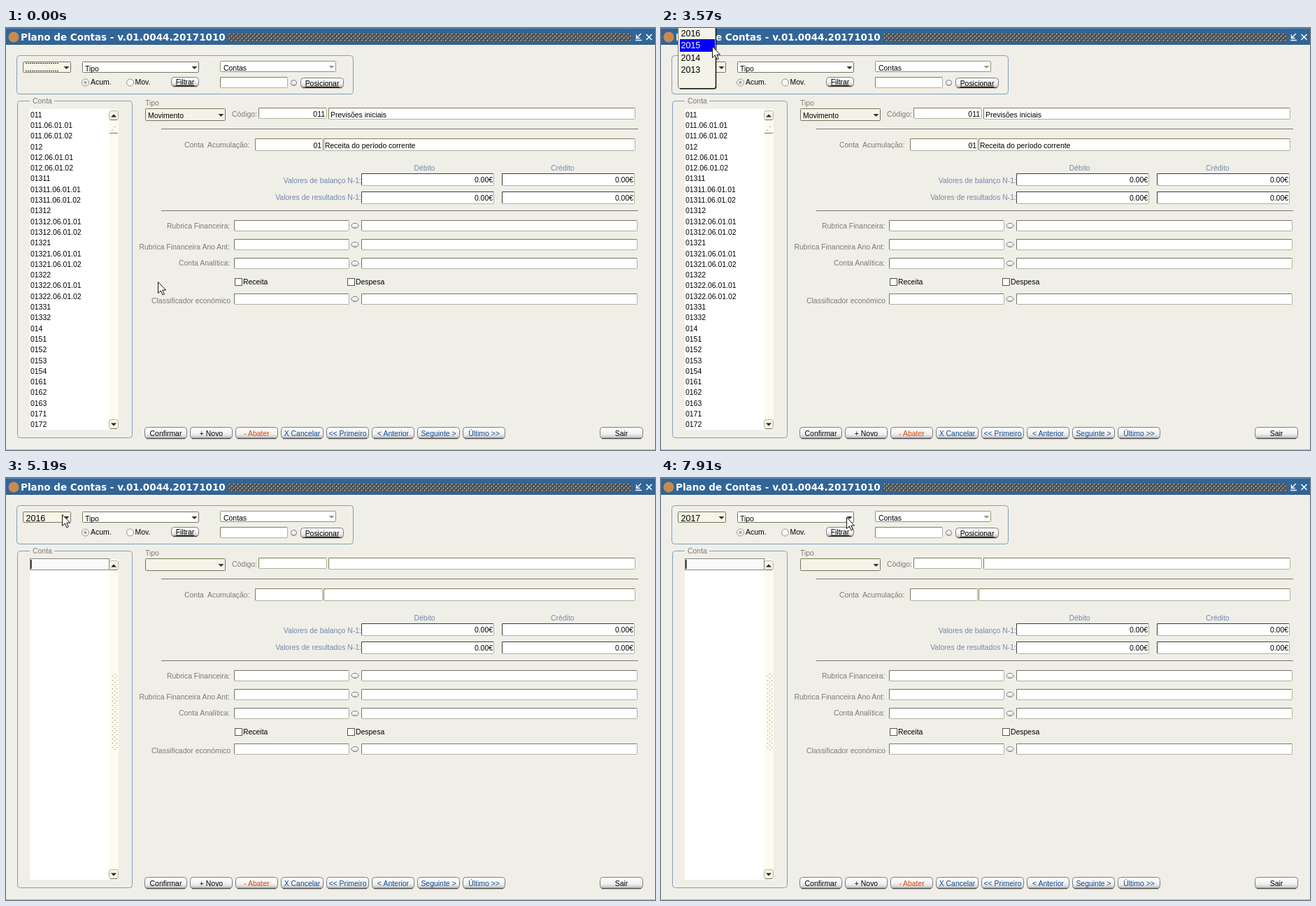
These frames come from a looping animation (928x604 px, 7990 ms). An HTML page:

```html
<!DOCTYPE html>
<html lang="pt">
<head>
<meta charset="utf-8">
<title>Plano de Contas</title>
<style>
  html, body { margin: 0; width: 100%; height: 100%; overflow: hidden; background: #f0efe7; }
  svg { display: block; }
  text { font: 10.45px "Liberation Sans", Arial, sans-serif; white-space: pre; }
  .title { font: bold 13.5px "DejaVu Sans", Verdana, sans-serif; }
  .year { font-size: 12.5px; }
</style>
</head>
<body>
<svg id="stage" width="928" height="604" viewBox="0 0 928 604">
  <defs>
    <linearGradient id="face" x1="0" y1="0" x2="0" y2="1">
      <stop offset="0" stop-color="#ffffff"/>
      <stop offset=".6" stop-color="#f0f0ee"/>
      <stop offset="1" stop-color="#bdbdbd"/>
    </linearGradient>
    <pattern id="bumps" width="6" height="6" patternUnits="userSpaceOnUse" y="1">
      <rect width="6" height="6" fill="#55595c"/>
      <path d="M1 1h1.5v1.5h-1.5zM4 4h1.5v1.5h-1.5z" fill="#d4d6d4"/>
      <path d="M2 2h1.5v1.5h-1.5zM5 5h1v1h-1z" fill="#2c2e30"/>
    </pattern>
    <pattern id="grip" width="6" height="6" x="151" y="279" patternUnits="userSpaceOnUse">
      <path d="M4 1h1.2v1.2h-1.2zM1 4h1.2v1.2h-1.2z" fill="#9a9a80"/>
    </pattern>
    <clipPath id="popClip"><rect id="popClipBox" width="100" height="140"/></clipPath>
  </defs>
</svg>
<script>
const stage = document.getElementById('stage');
const LOOP = 7990;
const GREY = '#7b7b76', BLUE = '#7189ad', LINK = '#0b4a96';
const OLIVE = '#7f7f58', DARK = '#3c3c38', STONE = '#74746a';

// ---- drawing helpers: each returns markup ----
const box = (x, y, x2, y2, fill, stroke = 'none', r = 0) =>
  `<rect x="${x}" y="${y}" width="${x2 - x}" height="${y2 - y}" rx="${r}" fill="${fill}" stroke="${stroke}"/>`;
const path = (d, stroke, fill = 'none', w = 1) =>
  `<path d="${d}" stroke="${stroke}" fill="${fill}" stroke-width="${w}"/>`;
// y is the middle of the capitals; baselines sit on whole pixels
const label = (s, x, y, fill = '#000', anchor = 'start', extra = '') =>
  `<text x="${x}" y="${Math.round(y + 3.6)}" fill="${fill}" text-anchor="${anchor}" ${extra}>${s.replace(/</g, '&lt;')}</text>`;
const arrow = (x, y, fill = '#333', dir = 1) =>
  path(`M${x - 4} ${y - 2 * dir}h8l-4 ${4 * dir}z`, 'none', fill);
const group = (id, ...parts) => `<g id="${id}">${parts.join('')}</g>`;

function field(x, y, x2, y2, edge = OLIVE) {
  return box(x + .5, y + .5, x2 - .5, y2 - .5, '#fff', '#b0b09c', 1) +
    path(`M${x + .5} ${y2 - 1}V${y + .5}H${x2 - 1}`, edge);
}
function combo(x, y, x2, y2, fill, edge = '#74745a', tip = '#333') {
  return box(x + .5, y + .5, x2 - .5, y2 - .5, fill, edge, 1) + arrow(x2 - 6.5, (y + y2) / 2 + 1, tip);
}
function button(x, y, x2, y2, s, fill = '#000', extra = '') {
  return box(x + .5, y + .5, x2 - .5, y2 - .5, 'url(#face)', '#7c7c82', 4) +
    path(`M${x + 3} ${y2 - .5}H${x2 - 3}`, '#4c4c52', 'none', 1.4) +
    label(s, (x + x2) / 2, (y + y2) / 2 + .5, fill, 'middle', extra);
}
const pill = (x, y, rx, ry) =>
  `<ellipse cx="${x}" cy="${y}" rx="${rx}" ry="${ry}" fill="url(#face)" stroke="#77777a"/>`;
const radio = x => `<circle cx="${x}" cy="78" r="5" fill="#f8f8f2" stroke="#93938f"/>`;

function titleBar() {
  return box(0, 0, 928, 24, '#326598') +
    path('M0 .5H928', '#5f87ae') + path('M0 23.5H928', '#285581') +
    '<circle cx="11" cy="13" r="7.5" fill="#c98a52"/>' +
    '<text class="title" x="21" y="18" fill="#fff">Plano de Contas - v.01.0044.20171010</text>' +
    box(317, 7, 895, 20, 'url(#bumps)') +
    path('M908 8l-6 6M901.5 9.5v5h5M900 17.5h9', '#fff', 'none', 1.4) +
    path('M915.5 9l8 8M923.5 9l-8 8', '#fff', 'none', 1.6);
}

function filters() {
  const line = 'text-decoration="underline"';
  return box(15.5, 39.5, 496.5, 94.5, 'none', '#7f9fbf', 4) +
    combo(24, 48, 93, 64, '#f5f5e8') +
    combo(109, 48, 276, 64, '#fff') + label('Tipo', 113, 58) +
    combo(306, 47, 472, 63, '#fff', '#8a9a6a', '#999') + label('Contas', 311, 57) +
    radio(113.5) + '<circle cx="113.5" cy="78" r="2.2" fill="#a8a8a2"/>' + label('Acum.', 121, 77.5) +
    radio(177.5) + label('Mov.', 184.5, 77.5) +
    button(236, 70, 276, 84, 'Filtrar', '#000', line) +
    field(306, 70, 403, 86) + pill(411.5, 78.5, 4, 4) +
    button(421, 71, 483, 86, 'Posicionar', '#000', line);
}

function listPanel() {
  const scroll = (y, dir) => box(147.5, y, 160.5, y + 13, '#f4f4e8', '#b5b5a2', 3) +
    path(`M149 ${y + 13}h10`, '#74745a') + arrow(154, y + 7, '#222', dir);
  return path('M34 104.5H20.5a4 4 0 0 0-4 4V582.5a4 4 0 0 0 4 4H176.5a4 4 0 0 0 4-4V108.5a4 4 0 0 0-4-4H69', '#7f9fbf') +
    label('Conta', 38, 104.5, GREY) +
    box(34, 116, 148, 575, '#fff') + box(148, 116, 161, 575, '#fbfbef') +
    scroll(118.5, -1) + scroll(560.5, 1);
}

function form() {
  let s = label('Tipo', 199, 107.5, GREY) + combo(199, 115, 314, 133, '#f3f3e8') +
    label('Código:', 323, 123, GREY) + field(361, 114, 459, 130) + field(461, 114, 900, 131) +
    path('M222 144.5H904M222 261.5H904', '#77776f') +
    label('Conta  Acumulação:', 255, 167, GREY) + field(356, 158, 453, 176) + field(454, 158, 900, 176) +
    label('Débito', 583.5, 200.5, BLUE) + label('Crédito', 779, 200.5, BLUE) +
    label('Valores de balanço N-1:', 508, 218, BLUE, 'end') +
    label('Valores de resultados N-1:', 508, 242.5, BLUE, 'end');
  for (const y of [208, 234])
    for (const x of [508, 709])
      s += field(x, y, x + 190, y + 18, DARK) + label('0.00€', x + 188, y + 9.2, '#000', 'end');
  const rows = [['Rubrica Financeira:', 230, 283.5, 283], ['Rubrica Financeira Ano Ant:', 190.5, 313, 310],
    ['Conta Analítica:', 247, 336, 337], ['Classificador económico', 208, 390, 388]];
  for (const [name, x, ty, y] of rows)
    s += label(name, x, ty, GREY) + field(326, y - 8, 491, y + 8, STONE) + pill(499, y, 5, 3.5) +
      field(508, y - 8, 903, y + 8, STONE);
  for (const [name, x] of [['Receita', 327], ['Despesa', 488]])
    s += box(x + .5, 358.5, x + 10.5, 368.5, '#fff', '#55554a') + label(name, x + 12, 363.5);
  const names = ['Confirmar', '+ Novo', '- Abater', 'X Cancelar', '<< Primeiro', '< Anterior', 'Seguinte >', 'Último >>'];
  names.forEach((n, i) => {
    const x = 198 + 65 * i;
    s += button(x, 571, x + 61, 588, n, i < 2 ? '#000' : i === 2 ? '#d2480f' : LINK);
  });
  return s + button(849, 571, 911, 588, 'Sair');
}

// account codes: heads that carry two sub-accounts, then plain ones
const codes = [];
for (const c of ['011', '012', '01311', '01312', '01321', '01322']) codes.push(c, c + '.06.01.01', c + '.06.01.02');
codes.push(...'01331 01332 014 0151 0152 0153 0154 0161 0162 0163 0171 0172'.split(' '));

const loaded = group('loaded',
  codes.map((c, i) => label(c, 35, 124 + 15.3 * i)).join(''),
  path('M148 150.5h12', '#74745a'), path('M151 147l2-2M155 142.5l2-2', '#a5a58c'),
  label('Movimento', 203, 125), label('011', 456, 123.5, '#000', 'end'), label('Previsões iniciais', 464, 124),
  label('01', 451, 168, '#000', 'end'), label('Receita do período corrente', 456, 168));
const emptied = group('emptied', box(151, 279, 159, 390, 'url(#grip)'));
const listCaret = group('caret', box(35, 116, 148, 131, '#f9f9f9'),
  `<rect id="rowEdge" x="34.5" y="115.5" width="113" height="16" fill="none" stroke="#85857e"/>`,
  path('M35.9 117v13', '#000', 'none', 1.4));
const dashes = group('dashes',
  '<path d="M28 50.5H76M28 61.5H76" stroke="#222" stroke-dasharray="2 1"/>');

// ---- year popup ----
const YEARS = ['2017', '2016', '2015', '2014', '2013', ''];
const PITCH = 17.25;
const popup = `<g clip-path="url(#popClip)"><g id="popup">
  <rect id="popBox" x="24.5" width="54" rx="3" fill="#f3f3e8" stroke="#77776a"/>
  <path id="popEdge" fill="none" stroke="#111" stroke-width="1.5"/>
  <rect id="mark" x="27" width="50" height="18" fill="#0000fb"/>
  ${YEARS.map(() => '<text class="year item" x="28.5"></text>').join('')}</g></g>`;

stage.insertAdjacentHTML('beforeend', box(0, 0, 928, 604, '#f0efe7') + path('M0 603.5H928', '#b9b9b0') +
  titleBar() + filters() + listPanel() + form() + loaded + emptied + listCaret + dashes +
  '<text id="year" class="year" x="28.5" y="62"></text>' + popup +
  group('pointer', path('M.5 .5V16.6L4.3 13L7 18.9L9.3 17.9L6.7 12.1H11.6Z', '#111', '#fff')));

const $ = id => document.getElementById(id);
const items = [...document.querySelectorAll('.item')];
const show = (id, on) => $(id).setAttribute('display', on ? 'inline' : 'none');

// pointer moves: first step, last step, tip positions at even steps
const moves = [
  [0, 0, [[217, 363]]],
  [1160, 1940, [[220, 360], [214, 303], [193, 218], [167, 135], [143, 78], [127, 55], [120, 48], [112, 47], [104, 49], [97, 52], [91, 55]]],
  [2010, 2010, [[81, 55]]],
  [2240, 2320, [[82, 54], [84, 54]]],
  [3420, 3950, [[80, 40], [76, 31], [73, 26], [71, 21], [68, 17], [65, 14], [62, 13], [60, 12]]],
  [4730, 5270, [[61, 14], [63, 20], [67, 28], [71, 36], [75, 43], [78, 49], [80, 52], [81, 54]]],
  [5900, 6050, [[79, 52], [75, 48], [71, 44]]],
  [7060, 7670, [[80, 43], [104, 44], [138, 46], [172, 48], [203, 50], [228, 52], [246, 53], [256, 54], [261, 54]]],
  [7840, 7910, [[263, 55], [265, 56]]],
];
function tip(t) {
  const [a, b, pts] = moves.findLast(m => t >= m[0]);
  const step = (b - a) / (pts.length - 1) || 1;
  return pts[Math.min(pts.length - 1, Math.floor((t - a) / step + .15))];
}

// each opening: shown, chosen, gone, middle of the top row, number of rows, preselected row
const openings = [
  { from: 2640, pick: 4430, to: 4500, top: -9, rows: 6, sel: 5 },
  { from: 5420, pick: 6430, to: 6520, top: 43, rows: 5, sel: 1 },
];
function drawPopup(t, [px, py]) {
  const o = openings.find(p => t >= p.from && t < p.to);
  show('popup', o);
  if (!o) return;
  const y = o.top - 12.5, end = o.top + (o.rows - 1) * PITCH + 9.5;
  const hot = px < 79 ? Math.max(0, Math.min(o.rows - 1, Math.floor((py - o.top + 9) / PITCH))) : o.sel;
  $('popClipBox').setAttribute('height', t >= o.pick ? 47 : 140);
  $('popBox').setAttribute('y', y);
  $('popBox').setAttribute('height', end - y);
  $('popEdge').setAttribute('d', `M27 ${end}H76q2.5 0 2.5 -2.5V${y + 3}`);
  $('mark').setAttribute('y', Math.round(o.top + hot * PITCH - 9.5));
  items.forEach((el, i) => {
    el.textContent = i < o.rows ? YEARS[i] : '';
    el.setAttribute('y', Math.round(o.top + i * PITCH + 3.9));
    el.setAttribute('fill', i === hot ? '#fff' : '#000');
  });
}

function draw() {
  const t = performance.now() % LOOP;
  const p = tip(t);
  const full = t < 4430;
  show('loaded', full);
  show('dashes', full);
  show('emptied', !full);
  show('caret', (t >= 4430 && t < 5420) || t >= 6430);
  show('rowEdge', (t >= 4730 && t < 5420) || t >= 7060);
  $('year').textContent = full ? '' : t < 6430 ? '2016' : '2017';
  drawPopup(t, p);
  $('pointer').setAttribute('transform', `translate(${p[0]} ${p[1]})`);
  requestAnimationFrame(draw);
}
draw();
</script>
</body>
</html>
```
